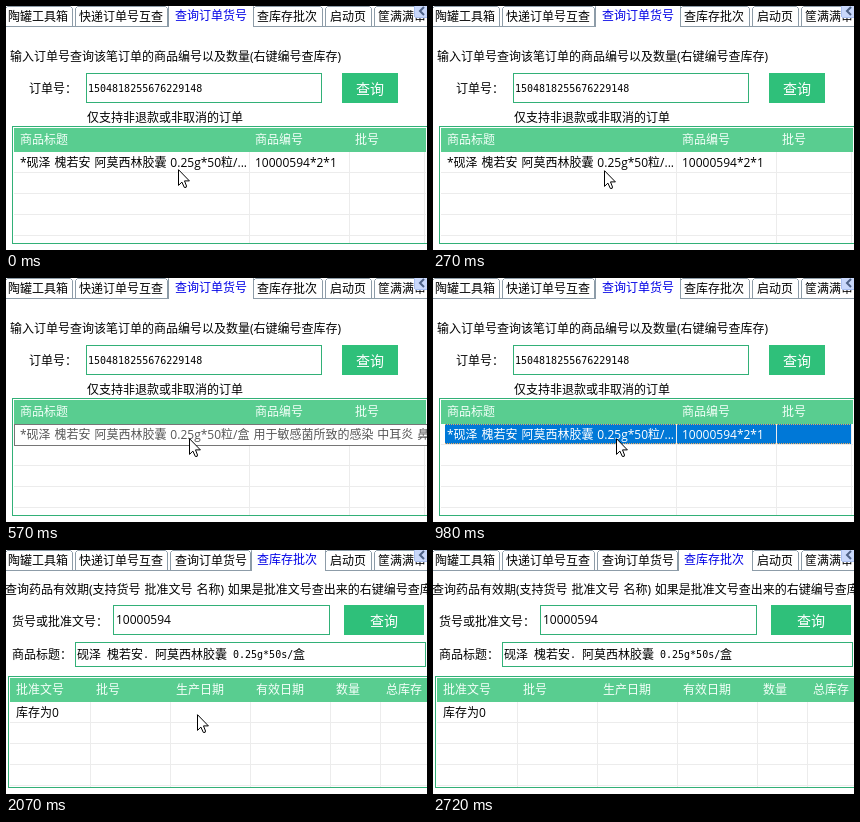
Recreate the animation shown at these times as an HTML page. Size 421 by 244 pixels, loop 3000 ms.

```html
<!DOCTYPE html>
<html lang="zh-CN">
<head>
<meta charset="utf-8">
<title>查询订单货号</title>
<style>
  html, body { margin: 0; width: 100%; height: 100%; overflow: hidden; background: #fff; }
  svg { display: block; width: 100vw; height: 100vh; }
  text { font: 12px "Open Sans", "Noto Sans CJK SC", "Noto Sans CJK", sans-serif; word-spacing: .8px; white-space: pre; }
  text.mono { font: 10px "DejaVu Sans Mono", monospace; word-spacing: 0; }
  rect, line { shape-rendering: crispEdges; }
</style>
</head>
<body>
<svg id="stage" viewBox="0 0 421 244" preserveAspectRatio="none"></svg>
<script>
const LOOP = 3000;
const GREEN = '#32b077', BUTTON = '#2fc07a', HEADER = '#59cd90', GRID = '#ececec', EDGE = '#8d9ca8';

const text = (x, y, s, fill = '#000', extra = '') =>
  `<text x="${x}" y="${y}" fill="${fill}" ${extra}>${s}</text>`;
const mono = (x, y, s) => text(x, y, s, '#000', 'class="mono"');
const rect = (x, y, w, h, fill, stroke = 'none', extra = '') =>
  `<rect x="${x}" y="${y}" width="${w}" height="${h}" fill="${fill}" stroke="${stroke}" ${extra}/>`;
const line = (x1, y1, x2, y2, stroke, extra = '') =>
  `<line x1="${x1}" y1="${y1}" x2="${x2}" y2="${y2}" stroke="${stroke}" ${extra}/>`;
const field = (x, y, w, h) => rect(x + .5, y + .5, w - 1, h - 1, '#fff', GREEN);
const button = (x, y, w, h) => rect(x, y, w, h, BUTTON) +
  text(x + w / 2, y + h / 2 + 5.5, '查询', '#fff', 'text-anchor="middle" style="font-size:14px"');
const group = (id, body) => `<g id="${id}">${body}</g>`;

// Tabs: left boundary, label position, label
const tabs = [
  [-2, 2, '陶罐工具箱'],
  [68, 73, '快递订单号互查'],
  [163, 169, '查询订单货号'],
  [246, 251, '查库存批次'],
  [318, 324, '启动页'],
  [367, 372, '筐满满审']
];

// The active tab grows over its neighbours and hides the line below it.
function tabBar(active) {
  const tab = i => {
    const on = i === active, [x, tx, label] = tabs[i];
    const next = i + 1 < tabs.length ? tabs[i + 1][0] : 440;
    const l = x + (on ? -.5 : 1.5), r = next + (on ? 1.5 : -1.5);
    const top = on ? -1.5 : .5, foot = on ? 21 : 20;
    return `<path d="M${l} ${foot}V${top + 2}l2 -2H${r - 2}l2 2V${foot}" fill="#fff" stroke="${EDGE}"/>` +
      text(tx, on ? 14 : 15, label, on ? '#0000e6' : '#000');
  };
  return tabs.map((_, i) => i === active ? '' : tab(i)).join('') +
    line(0, 20.5, 421, 20.5, EDGE) + tab(active) +
    rect(408.5, -4.5, 16, 16, '#c9d8fb', '#a9bff0', 'rx="2"') +
    '<path d="M418 1l-4 4 4 4" fill="none" stroke="#4d6185" stroke-width="2"/>';
}

function table(x, y, right, cols, labels) {
  const top = y + 26;
  let s = rect(x + .5, y + .5, right - x + .5, 237 - y, '#fff', GREEN) +
    rect(x + 2, y + 2, right - x - 2, 24, HEADER);
  for (let r = top + 20; r < 237; r += 21) s += line(x + 2, r + .5, right, r + .5, GRID);
  for (const c of cols) s += line(c + .5, top, c + .5, 237, GRID);
  for (const [tx, label] of labels) s += text(tx, y + 17.5, label, '#f4fff9');
  return s;
}

const drug = '*砚泽 槐若安 阿莫西林胶囊 0.25g*50粒/';
const row = fill => text(14, 161, drug + '...', fill) + text(249, 161, '10000594*2*1', fill);
const dots = y => line(12, y, 418, y, '#e8a860', 'stroke-dasharray="1 1"');

const orderPage = tabBar(2) +
  text(4, 55, '输入订单号查询该笔订单的商品编号以及数量(右键编号查库存)') +
  text(23, 86.5, '订单号：') +
  field(80, 67, 236, 30) + mono(82, 86, '1504818255676229148') +
  button(336, 67, 56, 30) +
  text(81, 115.5, '仅支持非退款或非取消的订单') +
  table(6, 120, 420, [243, 343, 418], [[14, '商品标题'], [249, '商品编号'], [349, '批号']]) +
  group('plain', row('#000')) +
  group('picked',
    rect(12, 146, 406, 20, '#0078d7') + dots(146.5) + dots(165.5) +
    line(243.5, 146, 243.5, 166, GRID) + line(343.5, 146, 343.5, 166, GRID) + row('#fff')) +
  group('tip',
    rect(8.5, 146.5, 430, 21, '#fff', '#767676') +
    text(14, 161, drug + '盒 用于敏感菌所致的感染 中耳炎 鼻窦炎', '#575757'));

const stockPage = tabBar(3) +
  text(-1, 43.5, '查询药品有效期(支持货号 批准文号 名称) 如果是批准文号查出来的右键编号查库存') +
  text(6, 76, '货号或批准文号：') +
  field(107, 55, 217, 30) + text(110, 74, '10000594') +
  group('caret', rect(110, 61, 1, 17, '#000')) +
  button(338, 55, 80, 30) +
  text(6, 109, '商品标题：') +
  field(69, 92, 351, 25) +
  text(71, 109, '砚泽') + text(101, 109, '槐若安') + mono(137, 108, '.') +
  text(149, 109, '阿莫西林胶囊') + mono(227, 108, '0.25g*50s/') + text(287, 109, '盒') +
  table(2, 126, 430, [84, 164, 244, 324, 374],
    [[10, '批准文号'], [90, '批号'], [170, '生产日期'], [250, '有效日期'], [330, '数量'], [380, '总库存']]) +
  text(10, 167, '库存为0');

const stage = document.getElementById('stage');
stage.innerHTML =
  rect(0, 0, 421, 244, '#fff') + group('order', orderPage) + group('stock', stockPage) +
  group('cursor', '<path d="M.5 .7V16.4L3.9 13.1L6.3 18.4H8.1L8.5 17L6.5 11.9H11.4Z" fill="#fff" stroke="#000"/>');

// Pointer: start time, x, y
const moves = [
  [0, 172, 163], [150, 164, 168], [270, 171, 164], [420, 177, 161], [570, 183, 160],
  [2070, 191, 164], [2210, 202, 171], [2330, 213, 178], [2450, 224, 185], [2600, 327, 230]
];

const el = id => document.getElementById(id);
const show = (id, on) => el(id).setAttribute('display', on ? 'inline' : 'none');

function draw(t) {
  const within = (a, b) => t >= a && t < b;
  show('order', t < 1510);
  show('stock', t >= 1510);
  show('plain', t < 420);
  show('tip', within(420, 980));
  show('picked', within(980, 1510));
  show('caret', within(1510, 2070));
  show('cursor', t < 2720);
  const [, x, y] = moves.filter(m => m[0] <= t).pop();
  el('cursor').setAttribute('transform', `translate(${x} ${y})`);
}

const start = performance.now();
function tick() {
  draw((performance.now() - start) % LOOP);
  requestAnimationFrame(tick);
}
tick();
</script>
</body>
</html>
```
